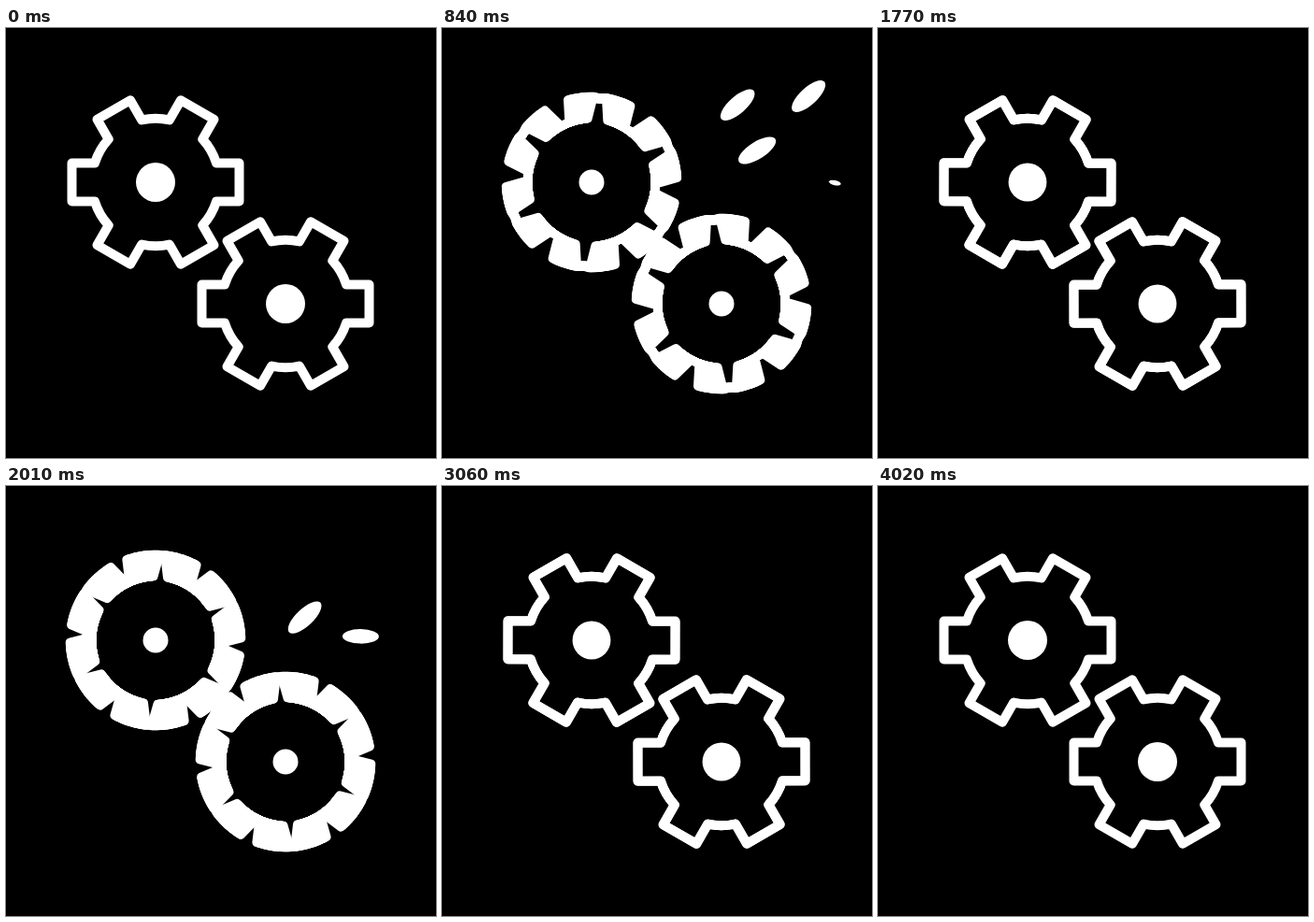
Write an HTML page with a canvas that moves like this. It is 460 px wide and 460 px high and loops after 4.05 s.

```html
<!DOCTYPE html>
<html lang="en">
<head>
<meta charset="utf-8">
<title>Turning gears</title>
<style>
  html, body { margin: 0; width: 100%; height: 100%; overflow: hidden; background: #000; }
  canvas { display: block; width: 460px; height: 460px; }
</style>
</head>
<body>
<canvas id="stage" width="460" height="460"></canvas>
<script>
const ctx = document.getElementById('stage').getContext('2d');
const LOOP = 4050, STEP = 30;
const SPIN_START = 720, SPIN_GAP = 1290;
const RAD = Math.PI / 180;

// Sparks leave the point where the gears meet and curve towards their end
const CONTACT = { x: 235, y: 222 };
const SPARKS = [
  { born: -4, life: 40, bend: { x: 385, y: 75 }, end: { x: 580, y: -95 } },
  { born: -4, life: 10, bend: { x: 322, y: 143 }, end: { x: 422, y: 166 } },
  { born: -0.4, life: 16, bend: { x: 280, y: 72 }, end: { x: 391.5, y: 42 } },
  { born: 0.4, life: 16, bend: { x: 330, y: 112 }, end: { x: 427, y: 95 } }
];

function gearPath() {
  const path = new Path2D(), body = 68.2, tip = 89.5, half = 20.5;
  const base = Math.asin(half / body);
  for (let i = 0; i < 6; i++) {
    const a = i * 60 * RAD, c = Math.cos(a), s = Math.sin(a);
    const line = (x, y) => path.lineTo(x * c - y * s, x * s + y * c);
    line(body * Math.cos(base), -half);
    line(tip, -half);
    line(tip, half);
    line(body * Math.cos(base), half);
    path.arc(0, 0, body, a + base, a + 60 * RAD - base);
  }
  path.closePath();
  return path;
}
const GEAR = gearPath();

// One full turn with a sharp burst of speed in the middle
function turn(n) {
  const x = n - 0.42;
  return 360 / (1 + Math.exp(-0.68 * x - 0.004 * x ** 3));
}

function spin(n) {
  const speed = turn(n + 0.5) - turn(n - 0.5);
  const blur = 23 * (1 - Math.exp(-speed / 13.5));
  return { angle: turn(n), blur, fade: Math.min(1, blur / 4) };
}

function drawGear(x, y, dir, { angle, blur, fade }) {
  const copies = Math.ceil(blur) + 1;
  ctx.lineWidth = 10 - fade;
  for (let i = 0; i < copies; i++) {
    const offset = copies > 1 ? (i / (copies - 1) - 0.5) * blur : 0;
    ctx.save();
    ctx.translate(x, y);
    ctx.rotate(dir * (angle + offset) * RAD);
    ctx.stroke(GEAR);
    ctx.restore();
  }
  ctx.beginPath();
  ctx.arc(x, y, 21 - 7.5 * fade, 0, 2 * Math.PI);
  ctx.fill();
}

function drawSpark({ born, life, bend, end }, n) {
  const age = n - born, p = age / life;
  if (p <= 0 || p >= 1) return;
  const u = 1 - (1 - p) ** 3, v = 1 - u;
  const at = k => v * v * CONTACT[k] + 2 * u * v * bend[k] + u * u * end[k];
  const slope = k => v * (bend[k] - CONTACT[k]) + u * (end[k] - bend[k]);
  const length = Math.min(46, 25 * age, 65 * (1 - p));
  ctx.beginPath();
  ctx.ellipse(at('x'), at('y'), length / 2, length * 0.2,
    Math.atan2(slope('y'), slope('x')), 0, 2 * Math.PI);
  ctx.fill();
}

function draw(now) {
  const t = Math.floor((now % LOOP) / STEP) * STEP;
  const cycle = Math.max(0, Math.min(2, Math.round((t - SPIN_START) / SPIN_GAP)));
  const n = (t - SPIN_START - cycle * SPIN_GAP) / STEP;
  const pose = spin(n);

  ctx.fillStyle = '#000';
  ctx.fillRect(0, 0, 460, 460);
  ctx.fillStyle = ctx.strokeStyle = '#fff';
  ctx.lineJoin = 'round';
  drawGear(160, 165, 1, pose);
  drawGear(299, 295, -1, pose);
  SPARKS.forEach(spark => drawSpark(spark, n));
}

const start = performance.now();
function tick() {
  draw(performance.now() - start);
  requestAnimationFrame(tick);
}
tick();
</script>
</body>
</html>
```
